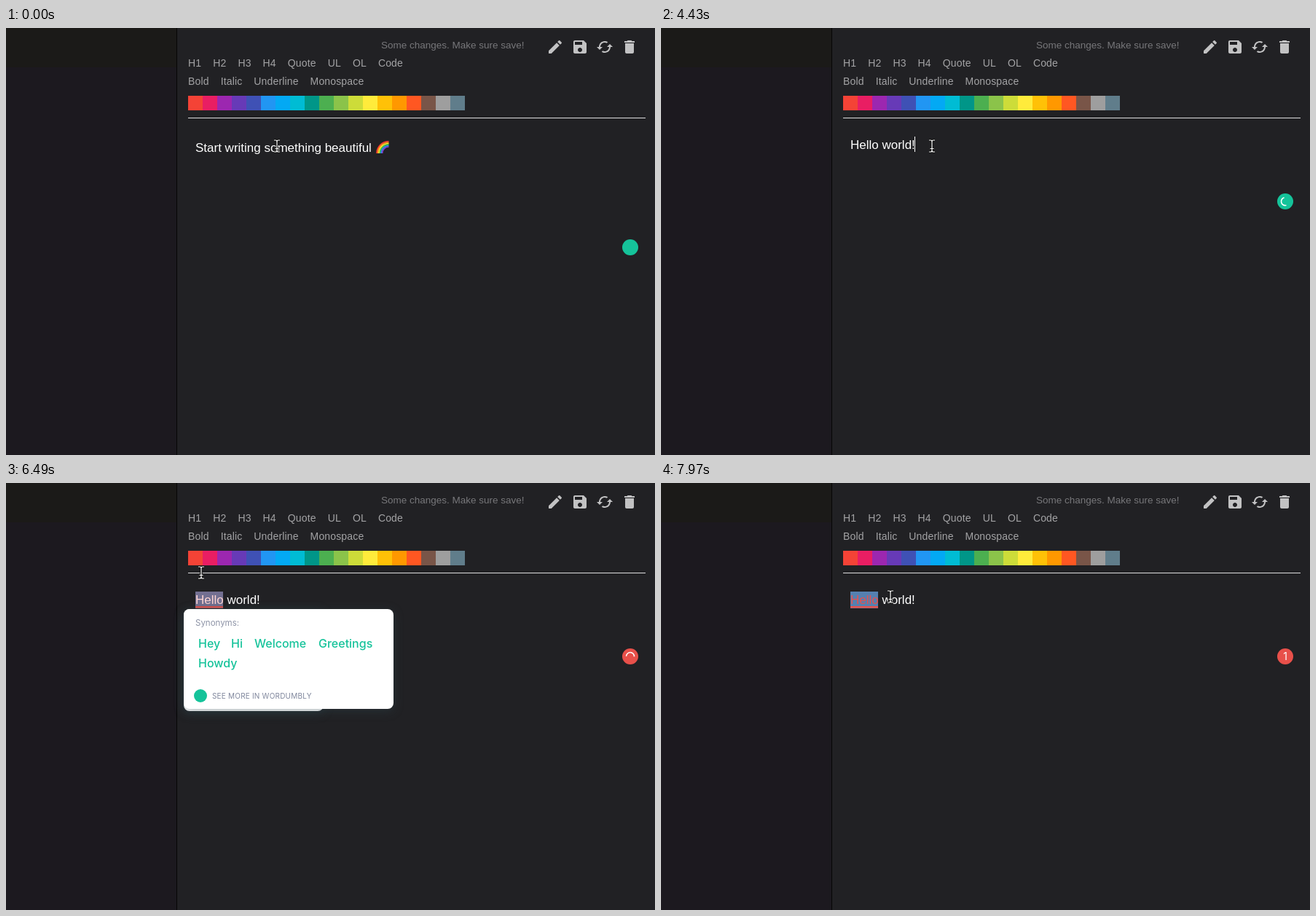
These frames come from a looping animation (891x586 px, 8000 ms). An HTML page:

```html
<!DOCTYPE html>
<html lang="en">
<head>
<meta charset="utf-8">
<title>Rich text editor</title>
<style>
  html, body { margin: 0; width: 100%; height: 100%; overflow: hidden; background: #212124; }
  svg { display: block; }
  text { white-space: pre; }
  .ui { font: 14px "Liberation Sans", Arial, sans-serif; letter-spacing: .15px; fill: #a3a3a5; }
  .body { font: 17px "Liberation Sans", Arial, sans-serif; fill: #fff; }
  .hint { font: 12px Roboto, sans-serif; fill: #6d758d; }
  .caps { font: 10px Inter, sans-serif; letter-spacing: .2px; fill: #7f869c; }
  .word { font: 18px Inter, sans-serif; letter-spacing: .3px; fill: #4f566e; }
  .syn { font: 500 16px Inter, sans-serif; fill: #15c39a; }
  .card { fill: #fff; filter: drop-shadow(0 3px 7px rgba(45, 70, 78, .4)); }
</style>
</head>
<body>
<svg width="891" height="586" viewBox="0 0 891 586">
  <rect width="891" height="586" fill="#212124"/>
  <rect width="234" height="586" fill="#1c191f"/>
  <rect width="234" height="54" fill="#1b1a18"/>
  <rect x="234" width="1" height="586" fill="#060606"/>

  <text class="ui" x="515" y="28" style="font-size:13.5px;letter-spacing:0;fill:#77777a">Some changes. Make sure save!</text>
  <g fill="#c2c2c3">
    <path transform="translate(742 14)" d="M3 17.25V21h3.75L17.81 9.94l-3.75-3.75L3 17.25zM20.71 7.04a1 1 0 0 0 0-1.41l-2.34-2.34a1 1 0 0 0-1.41 0l-1.83 1.83 3.75 3.75 1.83-1.83z"/>
    <path transform="translate(776 14)" d="M17 3H5c-1.11 0-2 .9-2 2v14c0 1.1.89 2 2 2h14c1.1 0 2-.9 2-2V7l-4-4zm-5 16c-1.66 0-3-1.34-3-3s1.34-3 3-3 3 1.34 3 3-1.34 3-3 3zm3-10H5V5h10v4z"/>
    <path transform="translate(810 14)" d="M19 8l-4 4h3c0 3.31-2.69 6-6 6-1.01 0-1.97-.25-2.8-.7l-1.46 1.46C8.97 19.54 10.43 20 12 20c4.42 0 8-3.58 8-8h3l-4-4zM6 12c0-3.31 2.69-6 6-6 1.01 0 1.97.25 2.8.7l1.46-1.46C15.03 4.46 13.57 4 12 4c-4.42 0-8 3.58-8 8H1l4 4 4-4H6z"/>
    <path transform="translate(844 14)" d="M6 19c0 1.1.9 2 2 2h8c1.1 0 2-.9 2-2V7H6v12zM19 4h-3.5l-1-1h-5l-1 1H5v2h14V4z"/>
  </g>
  <g id="tools"></g>
  <rect x="250" y="123" width="628" height="1" fill="#dededf"/>

  <g id="placeholder">
    <text class="body" x="260" y="170">Start writing something beautiful</text>
    <g id="rainbow" fill="none" stroke-width="1.7"></g>
  </g>

  <rect id="mark" x="260" y="149" width="38" height="23"/>
  <rect id="underline" x="260" y="169" width="38" height="2.5" fill="#e8504a"/>
  <text class="body" x="260" y="166" id="typed"><tspan id="first"></tspan><tspan id="rest"></tspan></text>
  <rect id="caret" width="1" height="21" fill="#fff"/>

  <g id="fix">
    <rect class="card" x="244" y="173" width="192" height="140" rx="8"/>
    <text class="hint" x="260" y="199">Add the punctuation</text>
    <text class="word" id="fixWord" x="260" y="230">Hello<tspan fill="#15c39a" font-weight="700">,</tspan></text>
    <path d="M259 256.5h16M264 256v-2.5h6v2.5M260.7 257v11q0 3 3 3h6.600q3 0 3-3v-11M265.200 261v6M268.800 261v6" fill="none" stroke="#cdd0d8" stroke-width="1.2"/>
    <text class="caps" x="283" y="266">IGNORE</text>
    <circle cx="267" cy="295" r="9" fill="#15c39a"/>
    <text class="caps" x="283" y="299">SEE MORE IN WORDUMBLY</text>
  </g>
  <g id="synonyms">
    <rect class="card" x="244" y="173" width="288" height="137" rx="8"/>
    <text class="hint" x="260" y="196" style="font:11.5px Inter,sans-serif;fill:#8d93a6">Synonyms:</text>
    <g class="syn">
      <text x="264" y="226">Hey</text><text x="309" y="226">Hi</text>
      <text x="341" y="226">Welcome</text><text x="429" y="226">Greetings</text>
      <text x="264" y="253">Howdy</text>
    </g>
    <circle cx="267" cy="292" r="9" fill="#15c39a"/>
    <text class="caps" x="283" y="296">SEE MORE IN WORDUMBLY</text>
  </g>

  <g id="badge">
    <circle id="disc" r="11"/>
    <path id="spinner" d="M0-5.500A5.500 5.500 0 0 1 0 5.500" fill="none" stroke="#fff" stroke-width="1.600"/>
    <text id="count" y="5" text-anchor="middle" fill="#fff" style="font:14px Inter,sans-serif">1</text>
  </g>

  <g id="beam" fill="none">
    <path id="beamShape" d="M-4-8h2q2 0 2 2v12q0 2-2 2h-2M4-8h-2q-2 0-2 2M4 8h-2q-2 0-2-2M-2.500 3.500h5" stroke="#111" stroke-width="3"/>
    <use href="#beamShape" style="stroke:#fff"/>
    <path d="M-4-8h2q2 0 2 2v12q0 2-2 2h-2M4-8h-2q-2 0-2 2M4 8h-2q-2 0-2-2M-2.500 3.500h5" stroke="#fff" stroke-width="1.200"/>
  </g>
  <path id="arrow" d="M0 0v14.500l3.300-3.100 2.300 5.300 2.500-1.100-2.300-5.100h4.600z" fill="#050505" stroke="#fff"/>
</svg>
<script>
const $ = id => document.getElementById(id);
const svg = (parent, tag, attrs, text = "") => {
  const el = document.createElementNS("http://www.w3.org/2000/svg", tag);
  for (const k in attrs) el.setAttribute(k, attrs[k]);
  el.textContent = text;
  return parent.appendChild(el);
};
const show = (id, on) => { $(id).style.display = on ? "" : "none"; };
const set = (id, attrs) => { for (const k in attrs) $(id).setAttribute(k, attrs[k]); };

[["H1 H2 H3 H4 Quote UL OL Code", 53], ["Bold Italic Underline Monospace", 78]].forEach(([labels, y]) => {
  let x = 250;
  for (const label of labels.split(" "))
    x += svg($("tools"), "text", { class: "ui", x, y }, label).getComputedTextLength() + 16;
});
"f44336 e91e63 9c27b0 673ab7 3f51b5 2196f3 03a9f4 00bcd4 009688 4caf50 8bc34a cddc39 ffeb3b ffc107 ff9800 ff5722 795548 9e9e9e 607d8b"
  .split(" ").forEach((c, i) => svg($("tools"), "rect", { x: 250 + 20 * i, y: 93, width: 20, height: 20, fill: "#" + c }));
["#f5342f", "#ff9a1e", "#ffe534", "#3ecb4a", "#2a8cf0", "#8a3fd0"].forEach((stroke, i) => {
  const r = 16.5 - 1.5 * i;
  svg($("rainbow"), "path", { d: `M${525.5 - r} 172A${r} ${r} 0 0 1 525.5 ${172 - r}`, stroke });
});

const message = "Hello world!";
// step, x, y of the pointer
const route = [[30, 372, 162], [31, 371, 142], [32, 368, 111], [33, 345, 101], [34, 314, 113], [35, 288, 142],
  [36, 276, 160], [38, 274, 165], [41, 274, 163], [44, 268, 123], [46, 258, 111], [47, 256, 108], [49, 256, 108],
  [50, 262, 114], [52, 300, 148], [54, 315, 156]];

function pointer(n) {
  const i = route.findIndex(p => p[0] >= n);
  if (i <= 0) return route[i < 0 ? route.length - 1 : 0].slice(1);
  const [a, b] = [route[i - 1], route[i]], f = (n - a[0]) / (b[0] - a[0]);
  return [a[1] + (b[1] - a[1]) * f, a[2] + (b[2] - a[2]) * f];
}

function draw(t) {
  const n = Math.floor(t / 147.6 + .06);
  const time = n * 147.6;

  const typed = n < 7 ? 0 : n < 9 ? 1 : Math.min(n - 7, message.length);
  const selected = n >= 40, coloured = n >= 49;
  show("placeholder", n < 7);
  $("first").textContent = message.slice(0, Math.min(typed, 5));
  $("rest").textContent = message.slice(5, Math.max(typed, 5));
  $("first").style.fill = coloured ? "#e5504f" : selected ? "#ffd6d3" : "#fff";

  const blink = n < 7 ? n >= 1 && n < 5 : n < 19 || (n - 19) % 8 < 4;
  show("caret", blink && !selected);
  set("caret", { x: n < 7 ? 260 : Math.round(260 + $("typed").getComputedTextLength() - .5), y: n < 7 ? 212 : 149 });

  show("mark", n >= 36);
  set("mark", { fill: coloured ? "#5580b0" : selected ? "#737092" : "#4a2b2f" });
  show("underline", n >= 34);
  show("fix", n >= 38 && n < 48);
  show("fixWord", n >= 39);
  show("synonyms", n >= 43 && n < 46);

  set("badge", { transform: `translate(857 ${n < 7 ? 301 : 238})` });
  set("disc", { fill: n < 34 ? "#15c39a" : "#e8504a" });
  show("spinner", n >= 12 && n < 51);
  show("count", n >= 51);
  const turn = n < 46 ? 175 + .923 * (time - 5609) : 90 + .923 * (time - 6937);
  set("spinner", { transform: `rotate(${turn})` });

  const onPalette = n >= 46 && n < 51;
  show("arrow", onPalette);
  show("beam", !onPalette);
  set(onPalette ? "arrow" : "beam", { transform: `translate(${pointer(n)})` });
}

function tick() {
  draw(performance.now() % 8000);
  requestAnimationFrame(tick);
}
tick();
</script>
</body>
</html>
```
